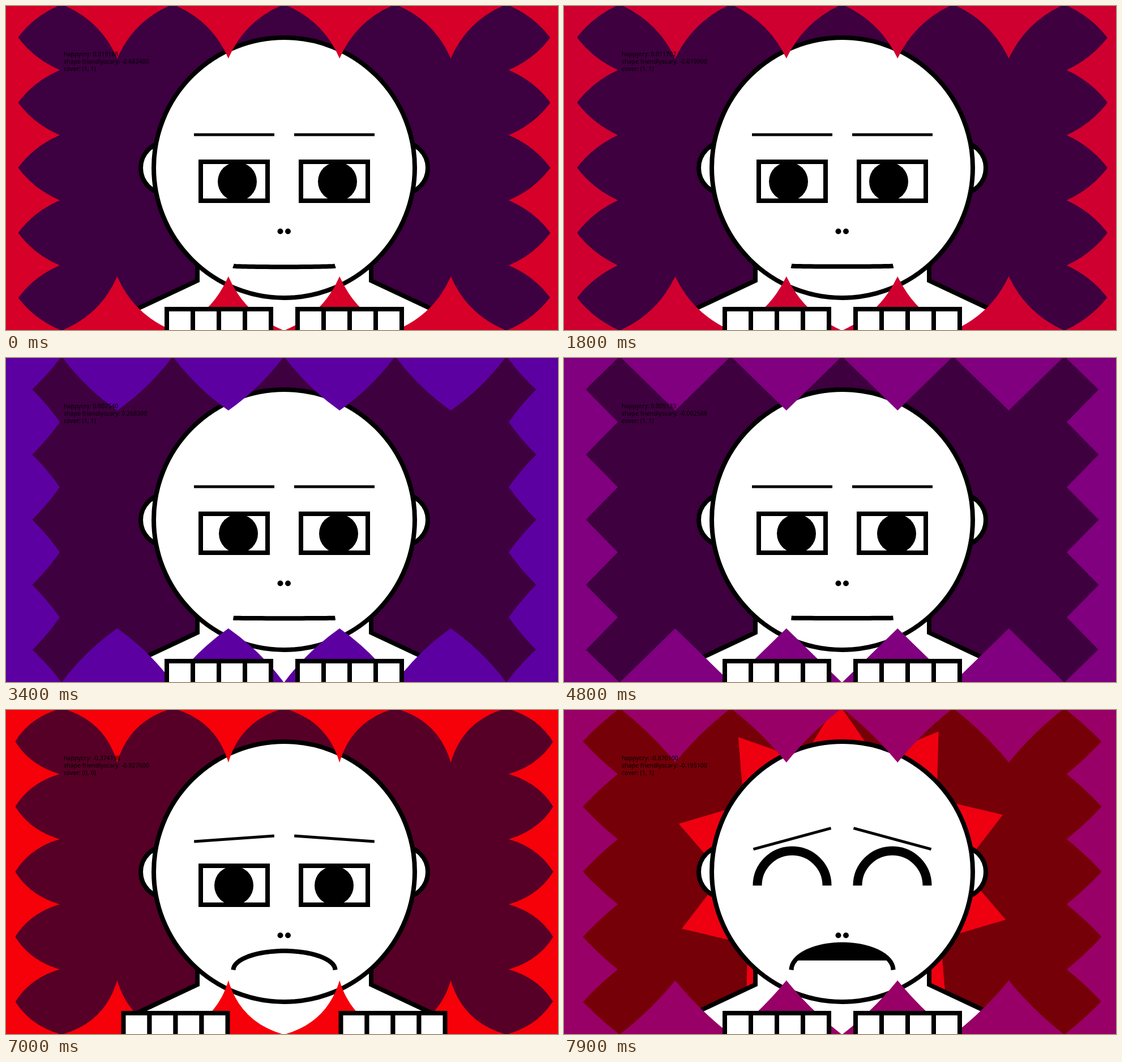
Animation, 975 px wide and 574 px high, one loop 8000 ms. Source, as an HTML page:

```html
<!DOCTYPE html>
<html lang="en">
<head>
<meta charset="utf-8">
<title>Mood face</title>
<style>
html, body { margin: 0; width: 100%; height: 100%; overflow: hidden; }
svg { display: block; width: 100vw; height: 100vh; }
text { font: 10.6px "Noto Sans", sans-serif; white-space: pre; }
.line { fill: none; stroke: #000; stroke-width: 8; }
.skin { fill: #fff; stroke: #000; stroke-width: 8; }
</style>
</head>
<body>
<svg id="stage" viewBox="0 0 975 574" preserveAspectRatio="none"></svg>
<script>
const LOOP = 8000, STEP = 100, STALL = 5200, RESUME = 5800;
const CX = 491.5, CY = 286.5;
const EYES = [403, 580];
const stage = document.getElementById('stage');

function add(tag, attrs = {}, parent = stage) {
  const node = document.createElementNS('http://www.w3.org/2000/svg', tag);
  set(node, attrs);
  parent.appendChild(node);
  return node;
}
function set(node, attrs) {
  for (const name in attrs) node.setAttribute(name, attrs[name]);
}
const show = (node, on) => set(node, { visibility: on ? 'visible' : 'hidden' });
const clamp = v => Math.max(0, Math.min(1, v));
const ramp = (t, from, to) => clamp((t - from) / (to - from));
const ease = (t, from, to) => {
  const u = ramp(t, from, to);
  return u * u * (3 - 2 * u);
};

// Red at -1, blue at +1.
const moodColor = (v, level) =>
  `rgb(${Math.round(level * (1 - v))},0,${Math.round(level * (1 + v))})`;

// The mood stalls for a moment, then jumps and sinks into crying.
function moodAt(t) {
  const spread = 76.5 * (ease(t, 6400, 6600) - ease(t, 7500, 7700));
  if (t >= RESUME) return {
    happy: -.0746 - .7955 * Math.pow(ramp(t, RESUME, 7900), 1.745),
    friendly: -.6632 - .2644 * ease(t, RESUME, 7000) + .7325 * ramp(t, 7000, 7900) ** 2,
    gaze: 401 + 1.5 * ease(t, RESUME, 7000),
    spread
  };
  const live = Math.min(t, STALL);
  return {
    happy: .019188 * Math.exp(-live / 3640),
    friendly: -.6824 + .0625 * ramp(live, 0, 1800)
      + .8882 * ease(live, 1800, 3400) - .315 * ease(live, 3500, STALL),
    gaze: 408.5 - 12 * ease(live, 0, 1800) + 14 * ease(live, 1800, 3400),
    spread
  };
}

// Scene, back to front
const back = add('rect', { width: 975, height: 574 });
const star = add('polygon');
for (const x of [284, 699]) add('circle', { class: 'skin', cx: x, cy: 287, r: 46 });
add('path', { class: 'skin', d: 'M338 440V486.5L118 590H865L645 486.5V440Z' });
add('circle', { class: 'skin', cx: CX, cy: CY, r: 230.5 });

const brows = EYES.map(x => add('line',
  { x1: x - 71, x2: x + 71, y1: 228, y2: 228, stroke: '#000', 'stroke-width': 5 }));
const openEyes = add('g');
const pupils = EYES.map(x => {
  add('rect', { class: 'line', x: x - 59, y: 276, width: 118, height: 69 }, openEyes);
  return add('circle', { cy: 311, r: 34.5 }, openEyes);
});
const shutEyes = add('g');
for (const x of EYES) add('path', { class: 'line', style: 'stroke-width:16',
  d: `M${x - 61.5} 311A61.5 61.5 0 0 1 ${x + 61.5} 311` }, shutEyes);
for (const x of [484.5, 498]) add('circle', { cx: x, cy: 399.3, r: 5 });
const gape = add('polygon');
const mouth = add('polyline', { class: 'line' });

const teeth = add('path');
const hands = [284, 515].map(x => {
  const g = add('g');
  for (let i = 0; i < 4; i++)
    add('rect', { class: 'skin', x: x + i * 46, y: 537, width: 46, height: 60 }, g);
  return g;
});
const labels = [89, 102, 115].map(y => add('text', { x: 102, y }));

// Points along an ellipse, angles in degrees, counter-clockwise from the right.
function arc(cx, cy, rx, ry, from, to, count) {
  return Array.from({ length: count + 1 }, (_, i) => {
    const a = (from + (to - from) * i / count) * Math.PI / 180;
    return `${(cx + rx * Math.cos(a)).toFixed(2)},${(cy - ry * Math.sin(a)).toFixed(2)}`;
  });
}

function starPoints(reach, spikes = 10) {
  const turn = 91.6, inner = reach * .7;
  const tips = arc(CX, CY, reach, reach, turn, turn + 360, spikes);
  const dips = arc(CX, CY, inner, inner, turn + 18, turn + 378, spikes);
  return tips.map((tip, i) => `${tip} ${dips[i]}`).join(' ');
}

// One tooth: apex, direction into the picture, bend from -1 to 1.
function tooth(x, y, dx, dy, bend) {
  const half = 98.2, depth = 96;
  const at = (across, down) =>
    `${(x + dy * across - dx * down).toFixed(2)} ${(y - dx * across - dy * down).toFixed(2)}`;
  const cw = half * (1 - bend) / 2, cd = depth * (1 + bend) / 2;
  // The extra skirt reaches past the edge of the stage.
  return `M${at(-half, depth + 9)}L${at(-half, depth)}Q${at(-cw, cd)} ${at(0, 0)}` +
    `Q${at(cw, cd)} ${at(half, depth)}L${at(half, depth + 9)}Z`;
}
function frame(bend) {
  let d = '';
  for (let i = 0; i < 6; i++) {
    const x = i * 196.4, y = -2 + i * 115.4;
    d += tooth(x, 93, 0, 1, bend) + tooth(x, 479, 0, -1, bend)
      + tooth(95, y, 1, 0, bend) + tooth(888, y, -1, 0, bend);
  }
  return d;
}

function drawMouth(happy) {
  const bow = 90 * Math.max(-.5, Math.min(.5, -happy));
  const open = 90 * ramp(-happy, .5, .99);
  const lips = (from, to) => arc(CX, 460.5, 90, bow, from, to, 31).join(' ');
  set(mouth, { points: lips(180, 0) });
  set(gape, { points: lips(90 + open, 90 - open) });
}

function draw(t) {
  const { happy, friendly, gaze, spread } = moodAt(t);
  const sadness = Math.max(0, -happy), crying = sadness > .5;
  const cover = t > 6400 && t < 7600 ? 0 : 1;

  set(back, { fill: moodColor(happy, 62.5) });
  set(star, { fill: moodColor(happy, 127.5), points: starPoints(346 * sadness) });
  set(teeth, { d: frame(-.6 * friendly), fill: moodColor(friendly, 127.5) });

  const tilt = 18.9 * Math.pow(sadness, 1.57);
  brows.forEach((b, i) => set(b,
    { transform: `rotate(${i ? tilt : -tilt} ${EYES[i]} 228)` }));
  show(openEyes, !crying);
  show(shutEyes, crying);
  pupils.forEach((p, i) => set(p, { cx: gaze + i * 177 }));
  drawMouth(happy);
  hands.forEach((h, i) => set(h, { transform: `translate(${i ? spread : -spread} 0)` }));

  labels[0].textContent = `happycry: ${happy.toFixed(6)}`;
  labels[1].textContent = `shape friendlyscary: ${friendly.toFixed(6)}`;
  labels[2].textContent = `cover: (${cover}, ${cover})`;
}

const start = performance.now();
function tick() {
  const t = (performance.now() - start) % LOOP;
  draw(Math.floor(t / STEP) * STEP);
  requestAnimationFrame(tick);
}
tick();
</script>
</body>
</html>
```
